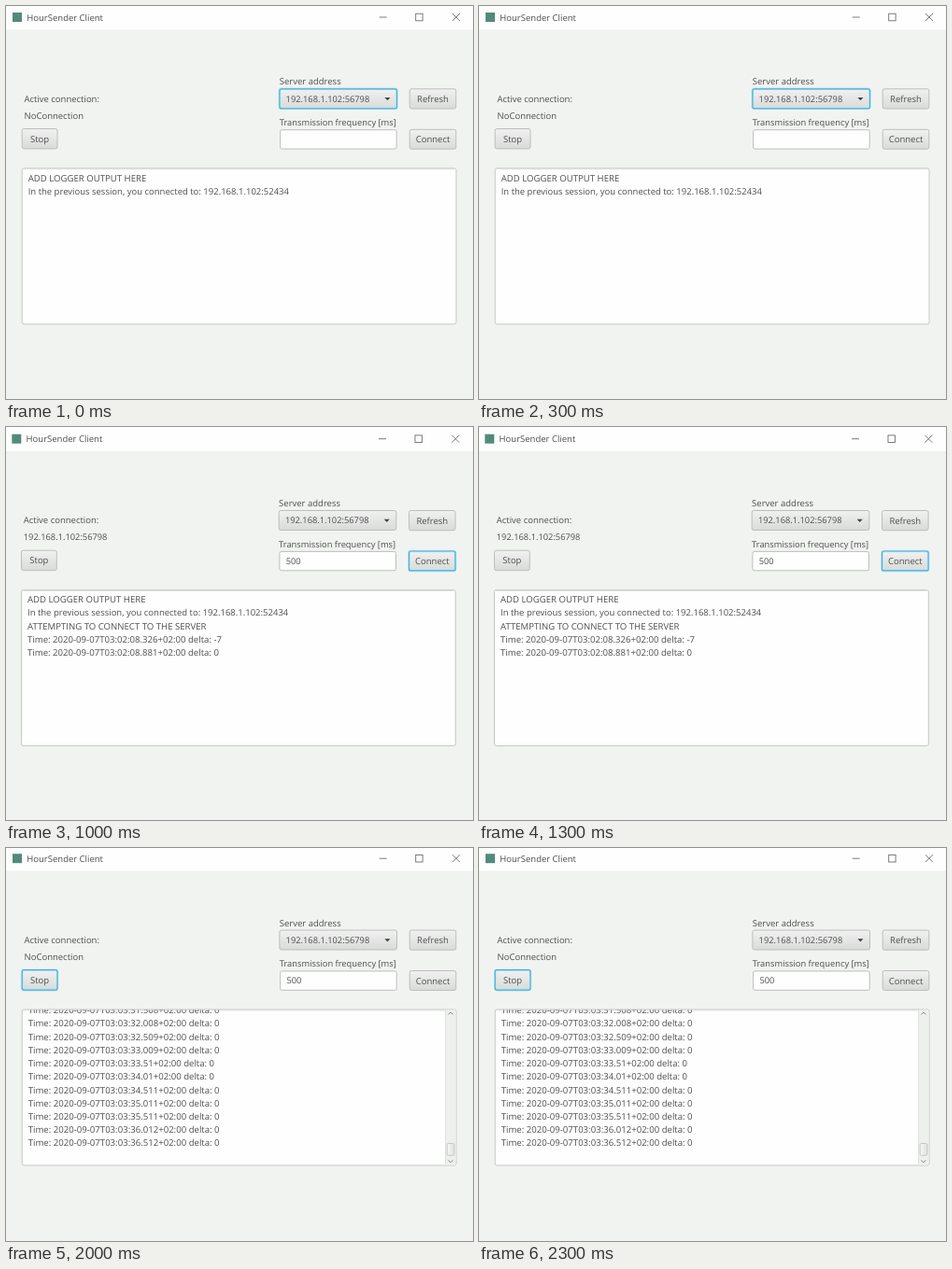
An HTML page for the animation above (2500 ms loop, 500 by 421 pixels).

```html
<!DOCTYPE html>
<html lang="en">
<head>
<meta charset="utf-8">
<title>HourSender Client</title>
<style>
  html, body { margin: 0; width: 100%; height: 100%; overflow: hidden; background: #f1f3f1; }
  svg { display: block; width: 500px; height: 421px; }
  text {
    font: 9.5px "Open Sans", "Noto Sans", sans-serif;
    fill: #4e4f4e;
    text-rendering: geometricPrecision;
    white-space: pre;
  }
  .mid { text-anchor: middle; }
  .ip { font-size: 9.3px; }
  .log { font-size: 9.6px; }
  .tight { font-size: 9.34px; }
</style>
</head>
<body>
<svg viewBox="0 0 500 421">
  <defs>
    <linearGradient id="face" x1="0" y1="0" x2="0" y2="1">
      <stop offset="0" stop-color="#f0f1f0"/>
      <stop offset="1" stop-color="#d9dbd9"/>
    </linearGradient>
    <linearGradient id="thumbFace">
      <stop offset="0" stop-color="#f6f7f6"/>
      <stop offset="1" stop-color="#dfe1df"/>
    </linearGradient>
    <clipPath id="view"><rect x="17.5" y="174.2" width="464" height="166"/></clipPath>
  </defs>
  <rect width="500" height="421" fill="#f1f3f1"/>
  <g id="win">
    <rect x="-5" y="-5" width="510" height="30.3" fill="#fdfefd"/>
    <rect x="7" y="7" width="10" height="10" fill="#538a7c"/>
    <text x="22.3" y="15.7">HourSender Client</text>
    <g fill="none" stroke="#6c6d6c" stroke-width=".9">
      <path d="M399.7 12H407.7M478 8l8 8m0-8l-8 8"/>
      <rect x="438.7" y="8.2" width="7.4" height="7.6"/>
    </g>

    <text x="19.5" y="102.7">Active connection:</text>
    <text id="state" x="19.5" y="120.7"></text>
    <text x="292.8" y="84.4">Server address</text>
    <text class="tight" x="292.8" y="128.1">Transmission frequency [ms]</text>

    <g id="controls"></g>
    <text class="ip" x="299.6" y="102.8">192.168.1.102:56798</text>
    <path d="M405.4 98h6l-3 3.3z" fill="#444"/>
    <text id="freq" class="ip" x="300.4" y="146.3"></text>

    <rect x="17.2" y="173.8" width="464.8" height="167" rx="2" fill="#fdfefd" stroke="#c6c8c6"/>
    <path d="M18.5 174.7H480.5" stroke="#dcdedc"/>
    <g id="log" clip-path="url(#view)"></g>
    <g id="bar">
      <rect x="470.6" y="174.4" width="10.9" height="165.8" fill="#eef0ee"/>
      <path d="M470.6 174.4V340.2" stroke="#d9dbd9" stroke-width=".8"/>
      <path d="M473.5 179.2l2.5-2.5 2.5 2.5M473.5 335.2l2.5 2.5 2.5-2.5" fill="none" stroke="#858685"/>
      <rect id="thumb" x="472.2" y="317.3" width="7.8" height="12.8" rx="1.5" fill="url(#thumbFace)" stroke="#bcbebc" stroke-width=".8"/>
    </g>
  </g>
</svg>
<script>
const NS = "http://www.w3.org/2000/svg";
const $ = id => document.getElementById(id);

function add(parent, tag, attrs, text) {
  const el = document.createElementNS(NS, tag);
  for (const k in attrs) el.setAttribute(k, attrs[k]);
  if (text) el.textContent = text;
  return parent.appendChild(el);
}

// name: [x, y, width, height, label]
const boxes = {
  combo: [292.9, 88.8, 125.6, 21, ""],
  refresh: [432.2, 88.8, 49.6, 21.2, "Refresh"],
  field: [293.6, 132.7, 124.6, 20.4, ""],
  connect: [432.2, 132.3, 49.6, 20.9, "Connect"],
  stop: [17.2, 131.5, 37.8, 21.4, "Stop"]
};
const rings = {};

for (const [name, [x, y, width, height, label]] of Object.entries(boxes)) {
  const shape = { x, y, width, height, rx: 2 };
  const g = $("controls");
  add(g, "rect", { ...shape, fill: name === "field" ? "#fdfefd" : "url(#face)", stroke: "#bcbebc" });
  const ring = rings[name] = add(g, "g", { fill: "none" });
  add(ring, "rect", { ...shape, stroke: "#bfe3f0", "stroke-width": 2.6 });
  add(ring, "rect", { ...shape, stroke: "#45b2da", "stroke-width": 1.2 });
  if (label) add(g, "text", { x: x + width / 2, y: y + 14.1, class: "mid" }, label);
}

const stamp = (clock, delta = 0) => `Time: 2020-09-07T03:${clock}+02:00 delta: ${delta}`;
const stamps = list => list.split(" ").map(s => stamp("03:" + s));

const intro = [
  "ADD LOGGER OUTPUT HERE",
  "In the previous session, you connected to: 192.168.1.102:52434"
];
const begun = [
  ...intro,
  "ATTEMPTING TO CONNECT TO THE SERVER",
  stamp("02:08.326", -7),
  stamp("02:08.881")
];
const running = stamps("06.471 06.972 07.473 07.974 08.474 08.976 09.477 09.977 10.478 10.979 11.479");
const stopped = stamps("31.508 32.008 32.509 33.009 33.51 34.01 34.511 35.011 35.511 36.012 36.512");

const IDLE = "NoConnection", HOST = "192.168.1.102:56798";
const STEP = 500, PITCH = 14.22, TOP = 187.5;

const scenes = [
  { focus: "combo", state: IDLE, freq: "", log: intro, at: [0, 0] },
  { focus: "field", state: IDLE, freq: "500", log: intro, at: [0, 0] },
  { focus: "connect", state: HOST, freq: "500", log: begun, at: [-0.7, 0.7] },
  { focus: "connect", state: HOST, freq: "500", log: running, at: [-0.7, 0], end: 319.6 },
  { focus: "stop", state: IDLE, freq: "500", log: stopped, at: [0, -0.8], end: 320.2 }
];

function show(s) {
  $("win").setAttribute("transform", `translate(${s.at})`);
  $("state").textContent = s.state;
  $("state").setAttribute("class", s.state === HOST ? "ip" : "");
  $("freq").textContent = s.freq;
  for (const name in rings) rings[name].style.display = name === s.focus ? "" : "none";
  $("bar").style.display = s.end ? "" : "none";
  const first = s.end ? s.end - (s.log.length - 1) * PITCH : TOP;
  $("log").replaceChildren();
  s.log.forEach((line, i) => {
    const cls = line.startsWith("In") ? "" : "log";
    add($("log"), "text", { x: 23.7, y: first + i * PITCH, class: cls }, line);
  });
}

let current = -1;
function tick() {
  const i = Math.floor(performance.now() / STEP) % scenes.length;
  if (i !== current) show(scenes[current = i]);
  requestAnimationFrame(tick);
}
tick();
</script>
</body>
</html>
```
